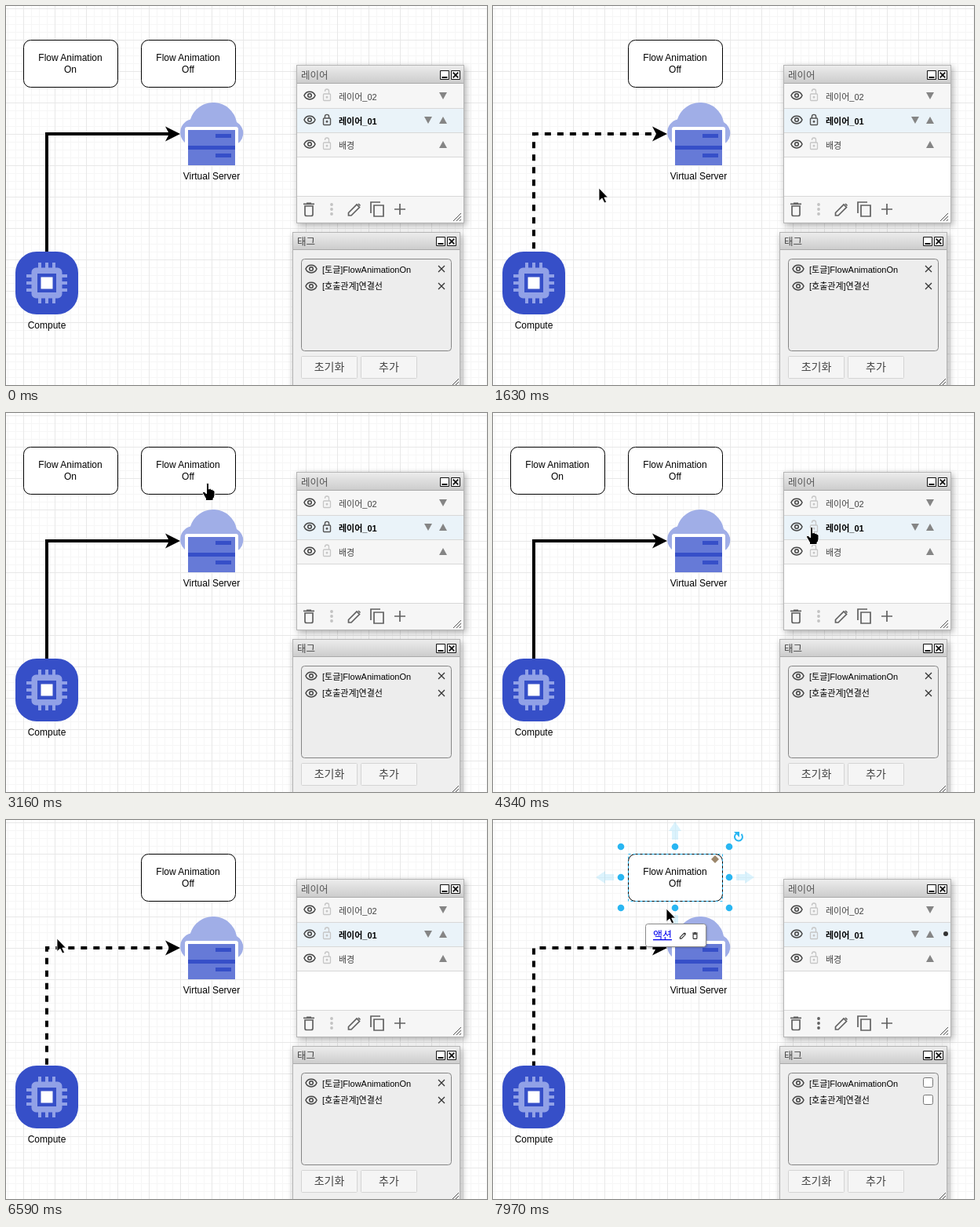
Animation, 613 px wide and 483 px high, one loop 8000 ms. Source, as an HTML page:

```html
<!DOCTYPE html>
<html lang="ko">
<head>
<meta charset="utf-8">
<title>Flow animation toggle</title>
<style>
html, body { margin: 0; width: 100%; height: 100%; overflow: hidden; background: #fff; }
svg { display: block; font: 12px "Liberation Sans", "Noto Sans CJK KR", "Noto Sans CJK", sans-serif; }
.mid { text-anchor: middle; }
.small { font-size: 11px; }
.box { fill: #fff; stroke: #000; }
.panel { filter: drop-shadow(2px 3px 4px #0005); }
.icon { fill: none; stroke: #616161; stroke-width: 1.7; }
.hidden { display: none; }
</style>
</head>
<body>
<svg width="613" height="483" viewBox="0 0 613 483">
<defs>
  <pattern id="grid" x="22" y="43" width="40" height="40" patternUnits="userSpaceOnUse">
    <path d="M10.5 0V40M20.5 0V40M30.5 0V40M0 10.5H40M0 20.5H40M0 30.5H40" stroke="#f6f6f6"/>
    <path d="M.5 0V40M0 .5H40" stroke="#e8e8e8"/>
  </pattern>
  <linearGradient id="bar" x2="0" y2="1">
    <stop stop-color="#ececec"/><stop offset="1" stop-color="#cbcbcb"/>
  </linearGradient>
  <g id="eye" fill="none" stroke="#444" stroke-width="1.5">
    <path d="M-7 0C-4.500-6.500 4.500-6.500 7 0C4.500 6.500-4.500 6.500-7 0z"/>
    <circle r="2.3"/>
  </g>
  <g id="lockBody"><rect x="-4.5" y="-2" width="9" height="8.5" rx="1" fill="none"/><circle cy="2.2" r=".8"/></g>
  <g id="openLock" fill="none" stroke="#c6c6c6" stroke-width="1.3">
    <use href="#lockBody"/><path d="M-2.5-5V-5.5a2.5 2.5 0 0 1 5 0V-2"/>
  </g>
  <g id="shutLock" fill="none" stroke="#555" stroke-width="1.4">
    <use href="#lockBody"/><path d="M-2.6-2V-4a2.6 2.6 0 0 1 5.2 0V-2"/>
  </g>
  <path id="down" d="M-5-4.5H5L0 4.5z" fill="#858585"/>
  <path id="up" d="M-5 4.5H5L0-4.5z" fill="#858585"/>
  <path id="cross" d="M-4-4 4 4M4-4-4 4" stroke="#333" stroke-width="1.3"/>
  <g id="windowButtons" fill="#fff" stroke="#111">
    <path d="M.5.5H11.5V11.5H.5zM14.5.5H25.5V11.5H14.5z"/>
    <path d="M2.5 9H9.5M16.7 2.700 23.300 9.300M23.300 2.700 16.700 9.300" stroke-width="1.8"/>
  </g>
  <path id="grip" d="M0 10 10 0M4 10 10 4M8 10 10 8" stroke="#555"/>
  <path id="trash" d="M-5-4.5V6q0 2 2 2H3q2 0 2-2V-4.5zM-7-7.2H7M-3-8.2H3"/>
  <path id="pencil" d="M-7.5 7.5V4L3-6.5 6.5-3-4 7.5zM5-7.5 7.5-5"/>
  <path id="growArrow" d="M-4 11V0H-8L0-12 8 0H4V11z" fill="#29b6f2" opacity=".17"/>
  <rect id="empty" x=".5" y=".5" width="12" height="12" rx="2" fill="#fff" stroke="#777"/>

  <path id="arrow" d="M0 0V16.5L4 13 7 19 9.500 17.800 6.800 12H11.500z" fill="#000" stroke="#fff" stroke-width=".8"/>
  <path id="hand" d="M-1.5 1.5Q0-1 1.5 1.5V8Q3.5 6.5 4.3 8.5 6.3 7.5 6.8 9.5 9 9 9 11.5V16Q8.5 19 7 20V22.5H-2.5V20L-6.5 13Q-6.5 10.5-4 11.5L-1.5 14z" fill="#000" stroke="#fff"/>
  <path id="move" d="M0-11 4-6.5H1.2V-1.2H6.5V-4L11 0 6.5 4V1.2H1.2V6.5H4L0 11-4 6.5H-1.2V1.2H-6.5V4L-11 0-6.5-4V-1.2H-1.2V-6.5H-4z" fill="#000" stroke="#fff" paint-order="stroke" stroke-width="2"/>
</defs>

<rect width="613" height="483" fill="url(#grid)"/>

<path id="flow" d="M52 313V163H209" fill="none" stroke="#000" stroke-width="4"/>
<path d="M222 163 203 153.5 208 163 203 172.5z"/>

<g>
  <rect x="12" y="313" width="80" height="80" rx="27" fill="#364fc8"/>
  <path id="pins" stroke="#91a1e7" stroke-width="4"/>
  <rect x="36.250" y="337.250" width="31.500" height="31.500" rx="2" fill="none" stroke="#91a1e7" stroke-width="7.500"/>
  <rect x="44.500" y="345.500" width="15" height="15" fill="#fff"/>
  <text class="mid" x="52" y="411">Compute</text>
</g>

<g>
  <path d="M236 178A17.200 17.200 0 0 1 235 144.500A30.400 30.400 0 0 1 294 148A16.300 16.300 0 0 1 290 178z" fill="#a0aee7"/>
  <path d="M228 203V157Q228 154 231 154H293Q296 154 296 157V203z" fill="#fff"/>
  <path d="M232 203V158H292V203z" fill="#667ad7"/>
  <path d="M232 178H292V183H232zM267 163H287V168H267zM267 188H287V193H267z" fill="#364fc8"/>
  <text class="mid" x="262" y="221">Virtual Server</text>
</g>

<g id="onButton">
  <rect class="box" x="22.500" y="43.500" width="120" height="60" rx="9"/>
  <text class="mid" x="82" y="70">Flow Animation<tspan x="82" y="85">On</tspan></text>
</g>
<g>
  <rect class="box" x="172.500" y="43.500" width="120" height="60" rx="9"/>
  <text class="mid" x="232" y="70">Flow Animation<tspan x="232" y="85">Off</tspan></text>
</g>

<g id="selection">
  <rect x="22.500" y="43.500" width="120" height="60" fill="none" stroke="#29b6f2" stroke-dasharray="3"/>
  <use href="#growArrow" x="82" y="14"/>
  <use href="#growArrow" transform="translate(171 73) rotate(90)"/>
  <use href="#growArrow" transform="translate(82 132) rotate(180)"/>
  <use href="#growArrow" transform="translate(-7 73) rotate(-90)"/>
  <g id="handles" fill="#29b6f2"></g>
  <path d="M160 17.500A5 5 0 1 0 166.500 18" fill="none" stroke="#29b6f2" stroke-width="2"/>
  <path d="M157 15H164V22z" fill="#29b6f2"/>
  <path id="diamond" d="M133 45 138 50 133 55 128 50z"/>
</g>
<g id="popup">
  <rect x="44.500" y="132.500" width="77" height="29" rx="3" fill="#fff" stroke="#8a8a8a" style="filter:drop-shadow(1px 1px 1px #0003)"/>
  <text x="54" y="151" font-size="13" fill="#00e" text-decoration="underline">액션</text>
  <g class="icon" style="stroke:#333;stroke-width:2.400">
    <use href="#pencil" transform="translate(92 147.500) scale(.48)"/>
    <use href="#trash" transform="translate(107.500 147.500) scale(.48)"/>
  </g>
</g>

<g class="panel">
  <rect x="370.500" y="75.500" width="213" height="201" fill="#fff" stroke="#b5b5b5"/>
  <rect x="371" y="76" width="212" height="23" fill="url(#bar)"/>
  <path d="M371 99H583V130H371zM371 161H583V192H371zM371 243H583V276H371z" fill="#f6f6f6"/>
  <path d="M371 130H583V161H371z" fill="#eaf3f9"/>
  <path d="M371 98.500H583" stroke="#aaa"/>
  <path d="M371 130.500H583M371 161.500H583M371 192.500H583M371 242.500H583" stroke="#d8d8d8"/>
</g>
<text x="376" y="92.500" font-size="12.500" fill="#555" font-weight="500">레이어</text>
<use href="#windowButtons" x="553" y="82"/>
<g id="layers"></g>
<use href="#shutLock" id="closed" x="409" y="145"/>
<use href="#openLock" id="opened" x="409" y="145"/>
<circle id="layerDot" cx="577" cy="145" r="3" fill="#333"/>
<g class="icon">
  <use href="#trash" x="386" y="259.500"/>
  <use href="#pencil" x="444" y="259.500"/>
  <path d="M465 264V250H477M469 254H481V268H469zM495 259H509M502 252V266"/>
</g>
<path id="dots" d="M415 253v.01M415 259v.01M415 265v.01" stroke-width="3.800" stroke-linecap="round"/>
<use href="#grip" x="570" y="264"/>

<g class="panel">
  <rect x="365.500" y="288.500" width="213" height="210" fill="#efefef" stroke="#b5b5b5"/>
  <rect x="366" y="289" width="212" height="22" fill="url(#bar)"/>
  <path d="M366 310.500H578" stroke="#aaa"/>
</g>
<text x="371" y="304.500" font-size="12.500" fill="#444" font-weight="500">태그</text>
<use href="#windowButtons" x="548" y="294"/>
<rect x="376.500" y="322.500" width="191" height="117" rx="4" fill="#ededed" stroke="#858585"/>
<use href="#eye" x="389" y="335"/><text class="small" x="403" y="340">[토글]FlowAnimationOn</text>
<use href="#eye" x="389" y="357"/><text class="small" x="403" y="361">[호출관계]연결선</text>
<g id="removeMarks"><use href="#cross" x="555" y="335"/><use href="#cross" x="555" y="357"/></g>
<g id="checks">
  <use href="#empty" x="548" y="328"/><use href="#empty" x="548" y="350"/>
  <g id="checked">
    <rect x="548" y="328" width="13" height="13" rx="2" fill="#0075ff"/>
    <path d="M550.500 334.500 553.500 337.500 558.500 331" fill="none" stroke="#fff" stroke-width="2"/>
  </g>
</g>
<g fill="#f5f5f5" stroke="#d4d4d4">
  <rect x="376.500" y="446.500" width="71" height="28" rx="1"/>
  <rect x="452.500" y="446.500" width="71" height="28" rx="1"/>
</g>
<g class="mid" font-size="14" fill="#444"><text x="412" y="464.500">초기화</text><text x="488" y="464.500">추가</text></g>
<use href="#grip" x="567" y="475"/>

<use id="cursor" href="#arrow"/>
</svg>

<script>
const LOOP = 8000;
const $ = id => document.getElementById(id);
const show = (id, on) => $(id).classList.toggle('hidden', !on);
const between = (t, a, b) => t >= a && t < b;

$('pins').setAttribute('d', [-9, 0, 9].map(o =>
  `M${52 + o} 327V334M${52 + o} 372V379M26 ${353 + o}H33M71 ${353 + o}H78`).join(''));

for (const x of [13, 82, 151]) for (const y of [34, 73, 112])
  if (x !== 82 || y !== 73) $('handles').innerHTML += `<circle cx="${x}" cy="${y}" r="4.3"/>`;

['레이어_02', '레이어_01', '배경'].forEach((name, i) => {
  const y = 114 + 31 * i, active = i === 1;
  $('layers').innerHTML += `<use href="#eye" x="387" y="${y}"/>
    ${active ? '' : `<use href="#openLock" x="409" y="${y}"/>`}
    <text class="small" x="424" y="${y + 5.5}" fill="${active ? '#000' : '#444'}"
      font-weight="${active ? 700 : 400}">${name}</text>
    ${i < 2 ? `<use href="#down" x="${active ? 538 : 557}" y="${y + .5}"/>` : ''}
    ${i > 0 ? `<use href="#up" x="557" y="${y + .5}"/>` : ''}`;
});

// Pointer hot spot: time, x, y
const path = [
  [130, 517, 427], [710, 94, 58], [1120, 94, 58], [1460, 82, 314], [1890, 235, 79],
  [3020, 235, 79], [3600, 385, 145], [3880, 385, 145], [3940, 406, 145],
  [4740, 406, 145], [5120, 105, 91], [5720, 105, 91], [6400, 65, 151],
  [6800, 65, 151], [7200, 194, 100], [7320, 205, 90], [7580, 205, 90], [7940, 221, 113]
];

function pointerAt(t) {
  const next = path.findIndex(p => p[0] > t);
  if (next < 1) return path[next < 0 ? path.length - 1 : 0].slice(1);
  const [t0, x0, y0] = path[next - 1], [t1, x1, y1] = path[next];
  const u = (t - t0) / (t1 - t0), e = u * u * (3 - 2 * u);
  return [x0 + (x1 - x0) * e, y0 + (y1 - y0) * e];
}

function pointerShape(x, y, t, onVisible, popup) {
  const inside = (l, top, r, b) => x >= l && x <= r && y >= top && y <= b;
  const overButton = onVisible && inside(22, 43, 143, 104) || inside(172, 43, 293, 104);
  if (overButton) return t < 4340 ? 'hand' : 'move';
  if (popup && inside(44, 132, 122, 162) || inside(376, 100, 416, 192)) return 'hand';
  return 'arrow';
}

function render(t) {
  const flowing = between(t, 1090, 2480) || t >= 6590;
  const onSelected = between(t, 5330, 6590), offSelected = t >= 7410;
  const selected = onSelected || offSelected;
  const popup = between(t, 5390, 6590) || t >= 7470;
  const unlocked = t >= 4340;

  const start = t < 6590 ? 1010 : 6550;
  $('flow').style.strokeDasharray = flowing ? '8' : 'none';
  $('flow').style.strokeDashoffset = -16 * ((t - start) / 500 % 1);

  show('onButton', !flowing);
  show('selection', selected);
  show('popup', popup);
  for (const id of ['selection', 'popup'])
    $(id).setAttribute('transform', `translate(${offSelected ? 150 : 0} 0)`);
  $('diamond').style.fill = offSelected ? '#9c876b' : '#f0a020';

  show('closed', !unlocked);
  show('opened', unlocked);
  show('layerDot', selected);
  show('removeMarks', !selected);
  show('checks', selected);
  show('checked', onSelected);
  $('dots').style.stroke = selected ? '#616161' : '#c2c2c2';

  const [x, y] = pointerAt(t).map(Math.round);
  show('cursor', t >= 130);
  $('cursor').setAttribute('href', '#' + pointerShape(x, y, t, !flowing, popup));
  $('cursor').setAttribute('transform', `translate(${x} ${y})`);
}

function frame() {
  render(performance.now() % LOOP);
  requestAnimationFrame(frame);
}
frame();
</script>
</body>
</html>
```
